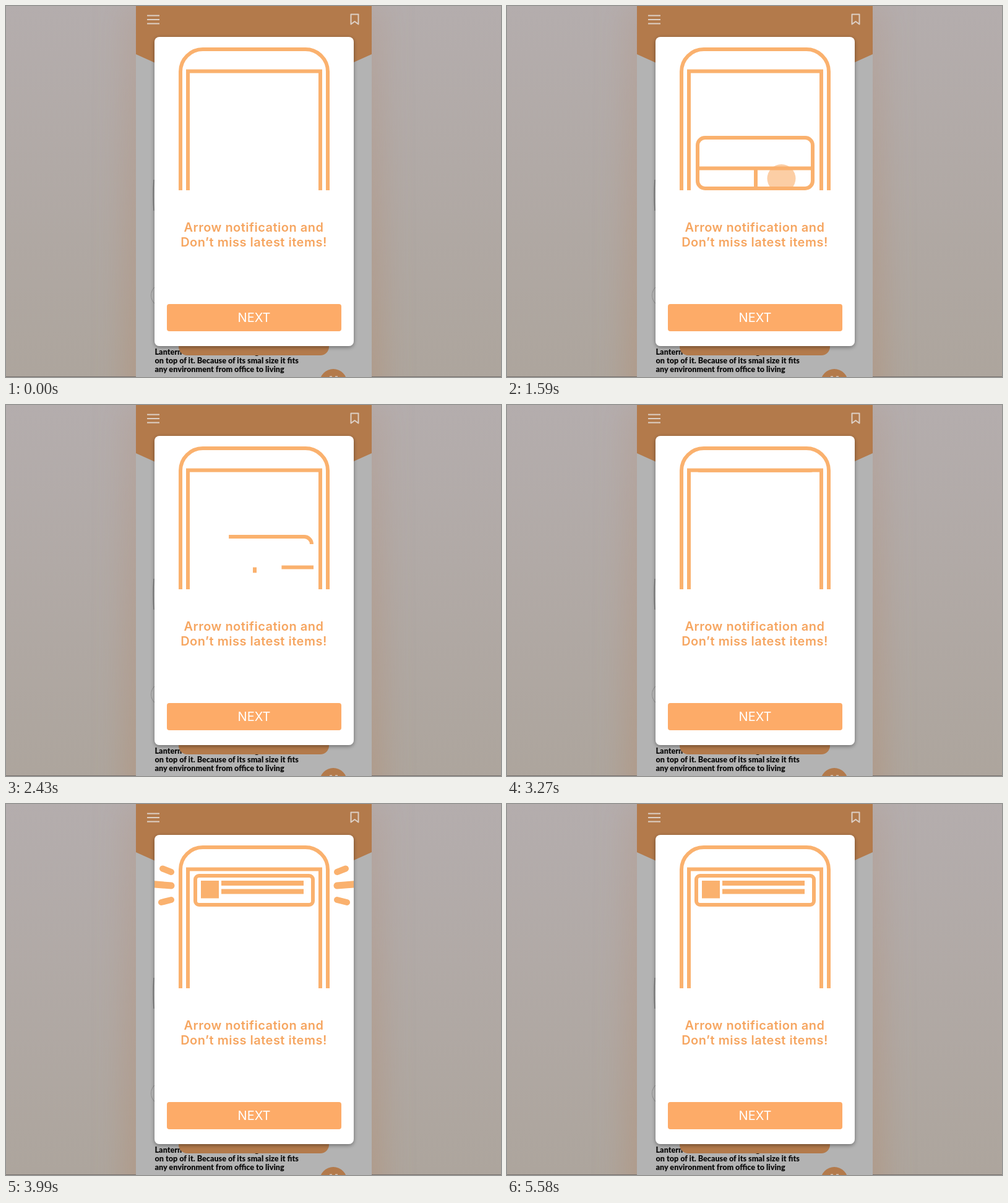
An HTML page that plays this animation: 800x600 px, repeating every 5.61 s.

```html
<!DOCTYPE html>
<html lang="en">
<head>
<meta charset="utf-8">
<title>Notification onboarding</title>
<style>
  html, body { margin: 0; width: 100%; height: 100%; overflow: hidden; background: #b1a9a6; }
  svg { display: block; width: 100vw; height: 100vh; }
  .copy { font: 900 12.6px Lato, sans-serif; fill: #0d0d0d; }
  .title { font: 600 20px Inter, sans-serif; letter-spacing: .5px; fill: #f6a661; text-anchor: middle; }
  .next { font: 400 20px Inter, sans-serif; fill: #fff; text-anchor: middle; }
  .line { fill: none; stroke: #fab16e; stroke-width: 6; }
  .ray { stroke-width: 10; stroke-linecap: round; }
  .icon { fill: none; stroke: #ddd0c6; stroke-width: 2; }
</style>
</head>
<body>
<svg viewBox="0 0 800 600" preserveAspectRatio="none">
  <defs>
    <linearGradient id="wall" x2="0" y2="1">
      <stop stop-color="#b4adad"/>
      <stop offset="1" stop-color="#ada59d"/>
    </linearGradient>
    <linearGradient id="glowTint" x2="0" y2="1">
      <stop stop-color="#b48a72" stop-opacity=".22"/>
      <stop offset="1" stop-color="#b48a6a" stop-opacity=".42"/>
    </linearGradient>
    <filter id="glow" x="-50%" y="-20%" width="200%" height="140%"><feGaussianBlur stdDeviation="24"/></filter>
    <filter id="shadow" x="-10%" y="-10%" width="120%" height="120%">
      <feDropShadow dx="0" dy="2" stdDeviation="3" flood-opacity=".4"/>
    </filter>
    <clipPath id="cardClip"><rect x="240" y="50" width="322" height="500" rx="8"/></clipPath>
    <clipPath id="screenClip"><rect x="297" y="107" width="208" height="191"/></clipPath>
  </defs>

  <!-- dimmed app -->
  <rect width="800" height="600" fill="url(#wall)"/>
  <rect x="190" y="0" width="420" height="640" fill="url(#glowTint)" filter="url(#glow)"/>
  <path d="M0 599.5H800" stroke="#77716e"/>
  <rect x="210" width="381" height="600" fill="#b3b3b3"/>
  <path d="M210 0H591V78L400 164L210 78Z" fill="#b37a4b"/>
  <path class="icon" d="M228 15.5h20M228 22h20M228 28.5h20"/>
  <path class="icon" d="M557.5 13.5h12v16l-6-4.500l-6 4.500z" stroke-linejoin="round"/>
  <circle cx="253" cy="468" r="18.500" fill="#b8b8b8" stroke="#919191"/>
  <path d="M239 281q-2 25 0 50" fill="none" stroke="#858585" stroke-width="1.500"/>
  <text class="copy" x="240.500" y="564">Lantern</text>
  <text class="copy" x="402" y="564">g</text>
  <text class="copy" x="240.500" y="578">on top of it. Because of its smal size it fits</text>
  <text class="copy" x="240.500" y="592">any environment from office to living</text>
  <rect x="279" y="520" width="243" height="45" rx="14" fill="#b37a4b"/>
  <circle cx="529" cy="609" r="22" fill="#b37a4b"/>
  <path d="M523 599.500h4M532 599.500h4" stroke="#d3c2b5" stroke-width="2"/>

  <!-- card -->
  <rect x="240" y="50" width="322" height="500" rx="8" fill="#fff" filter="url(#shadow)"/>
  <g clip-path="url(#cardClip)">
    <g clip-path="url(#screenClip)">
      <g id="dialog">
        <path class="line" pathLength="1" d="M494 225A12 12 0 0 0 482 213H320A12 12 0 0 0 308 225V283A12 12 0 0 0 320 295H482A12 12 0 0 0 494 283Z"/>
        <path class="line" pathLength="1" d="M497 262.500H308"/>
        <path class="line" pathLength="1" d="M402 262.500V295"/>
      </g>
      <circle id="tap" cx="443.500" cy="279" r="23" fill="#fab16e"/>
      <g id="notice">
        <rect class="line" x="306" y="116" width="190" height="47" rx="6"/>
        <path fill="#fab16e" d="M315 124h29v28.500h-29zM348 124h133v8h-133zM348 137.500h133v8h-133z"/>
      </g>
    </g>
    <path class="line" d="M282 298V106A36 36 0 0 1 318 70H484A36 36 0 0 1 520 106V298"/>
    <path class="line" d="M294 298V105.500H508V298"/>
    <g id="rays">
      <g id="side">
        <path class="line ray" pathLength="1" d="M267 110L253 104.500"/>
        <path class="line ray" style="stroke-width:11" pathLength="1" d="M267 132L235 129.500"/>
        <path class="line ray" pathLength="1" d="M267 155L251 159"/>
      </g>
      <use href="#side" transform="translate(802) scale(-1 1)"/>
    </g>
  </g>
  <text class="title" x="400.500" y="365">Arrow notification and</text>
  <text class="title" x="400.500" y="389">Don’t miss latest items!</text>
  <rect x="260" y="482" width="282" height="44" rx="4" fill="#fdab68"/>
  <text class="next" x="401" y="511">NEXT</text>
</svg>
<script>
  const LOOP = 5610;
  const el = id => document.getElementById(id);
  const [dialog, tap, notice, rays] = ['dialog', 'tap', 'notice', 'rays'].map(el);
  const ramp = (t, from, to) => Math.min(1, Math.max(0, (t - from) / (to - from)));
  const sine = x => (1 - Math.cos(Math.PI * x)) / 2;
  const cubic = x => x < .5 ? 4 * x ** 3 : 1 - 4 * (1 - x) ** 3;
  const smooth = x => (sine(x) + cubic(x)) / 2;
  const show = (node, on) => node.style.visibility = on ? 'visible' : 'hidden';

  // Shows only the stretch between two fractions of each path in the group.
  function trim(group, start, end) {
    show(group, end - start > .001);
    for (const path of group.querySelectorAll('path')) {
      path.style.strokeDasharray = start <= 0 && end >= 1 ? 'none' : `${end - start} 3`;
      path.style.strokeDashoffset = -start;
    }
  }

  function draw(t) {
    trim(dialog, 0, smooth(ramp(t, 30, 810)) - smooth(ramp(t, 1950, 2730)));
    tap.style.opacity = .62 * (sine(ramp(t, 1050, 1440)) - sine(ramp(t, 1620, 1950)));
    notice.setAttribute('transform', `translate(0 ${-60 * (1 - cubic(ramp(t, 3120, 3780)))})`);
    show(notice, t >= 3120);
    trim(rays, sine(ramp(t, 4260, 4800)), sine(ramp(t, 3690, 3960)));
  }

  const begin = performance.now();
  function tick() {
    draw((performance.now() - begin) % LOOP);
    requestAnimationFrame(tick);
  }
  draw(0);
  requestAnimationFrame(tick);
</script>
</body>
</html>
```
